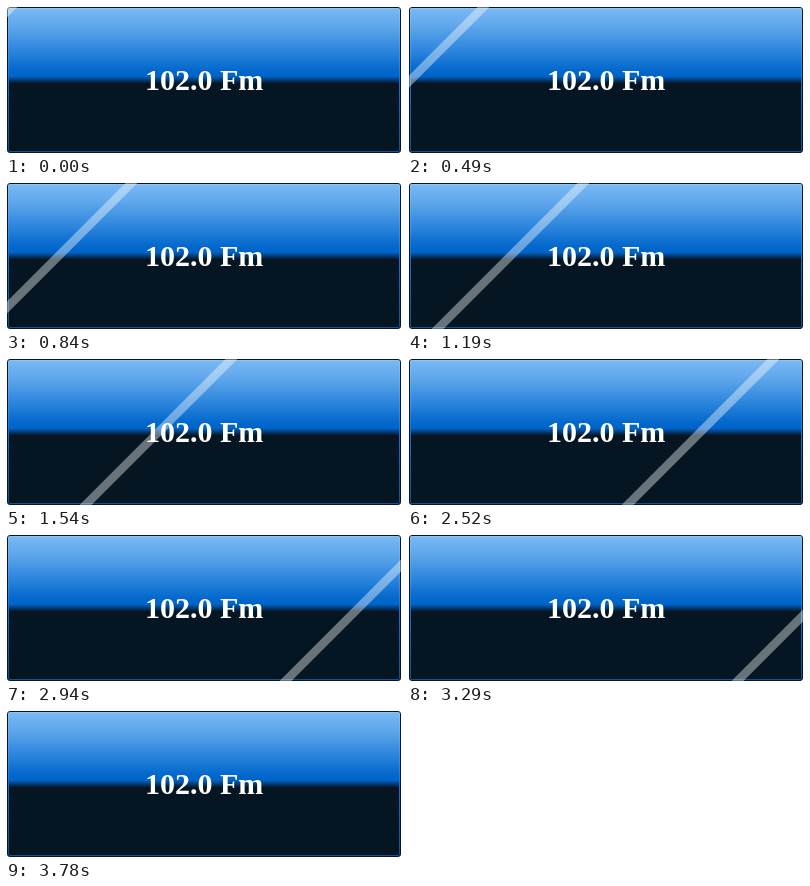
Write an HTML page that moves like this. It is 396 by 148 pixels and loops after 4780 ms.

```html
<!DOCTYPE html>
<html lang="en">
<head>
<meta charset="utf-8">
<title>Radio button</title>
<style>
  html, body { margin: 0; width: 100%; height: 100%; overflow: hidden; background: #fff; }
  svg { display: block; }
  text { font: bold 30px "Liberation Serif", "Times New Roman", serif; fill: #fff; }
</style>
</head>
<body>
<svg width="396" height="148" viewBox="0 0 396 148">
  <defs>
    <linearGradient id="glass" gradientUnits="userSpaceOnUse" x1="0" y1="2" x2="0" y2="146">
      <stop offset="0" stop-color="#7ab9f5"/>
      <stop offset=".12" stop-color="#61a8ec"/>
      <stop offset=".3" stop-color="#2b85dc"/>
      <stop offset=".43" stop-color="#0468cd"/>
      <stop offset=".475" stop-color="#0063c8"/>
      <stop offset=".525" stop-color="#051521"/>
      <stop offset="1" stop-color="#051521"/>
    </linearGradient>
    <linearGradient id="rim" gradientUnits="userSpaceOnUse" x1="0" y1="2" x2="0" y2="146">
      <stop offset="0" stop-color="#8cc4f8"/>
      <stop offset=".5" stop-color="#1673d2"/>
      <stop offset="1" stop-color="#1a4f88"/>
    </linearGradient>
    <clipPath id="face"><rect x="1" y="1" width="394" height="146"/></clipPath>
  </defs>
  <rect x="1.5" y="1.5" width="393" height="145" rx="2.5" fill="url(#glass)" stroke="#04142a"/>
  <rect x="2.5" y="2.5" width="391" height="143" rx="1.5" fill="none" stroke="url(#rim)"/>
  <text x="139" y="84">102.0 Fm</text>
  <g clip-path="url(#face)">
    <path id="shine" d="M.5 0H12.5L-135.5 148H-147.5Z" fill="#fff" fill-opacity=".4"/>
  </g>
</svg>
<script>
  const STEP = 70, SHIFT = 10, LAST = 54, LOOP = 4780;
  const shine = document.getElementById("shine");
  const start = performance.now();

  function draw(now) {
    const t = Math.max(0, now - start) % LOOP;
    const n = Math.min(LAST, Math.floor(t / STEP));
    shine.setAttribute("transform", `translate(${n * SHIFT} 0)`);
    requestAnimationFrame(draw);
  }
  draw(start);
</script>
</body>
</html>
```
